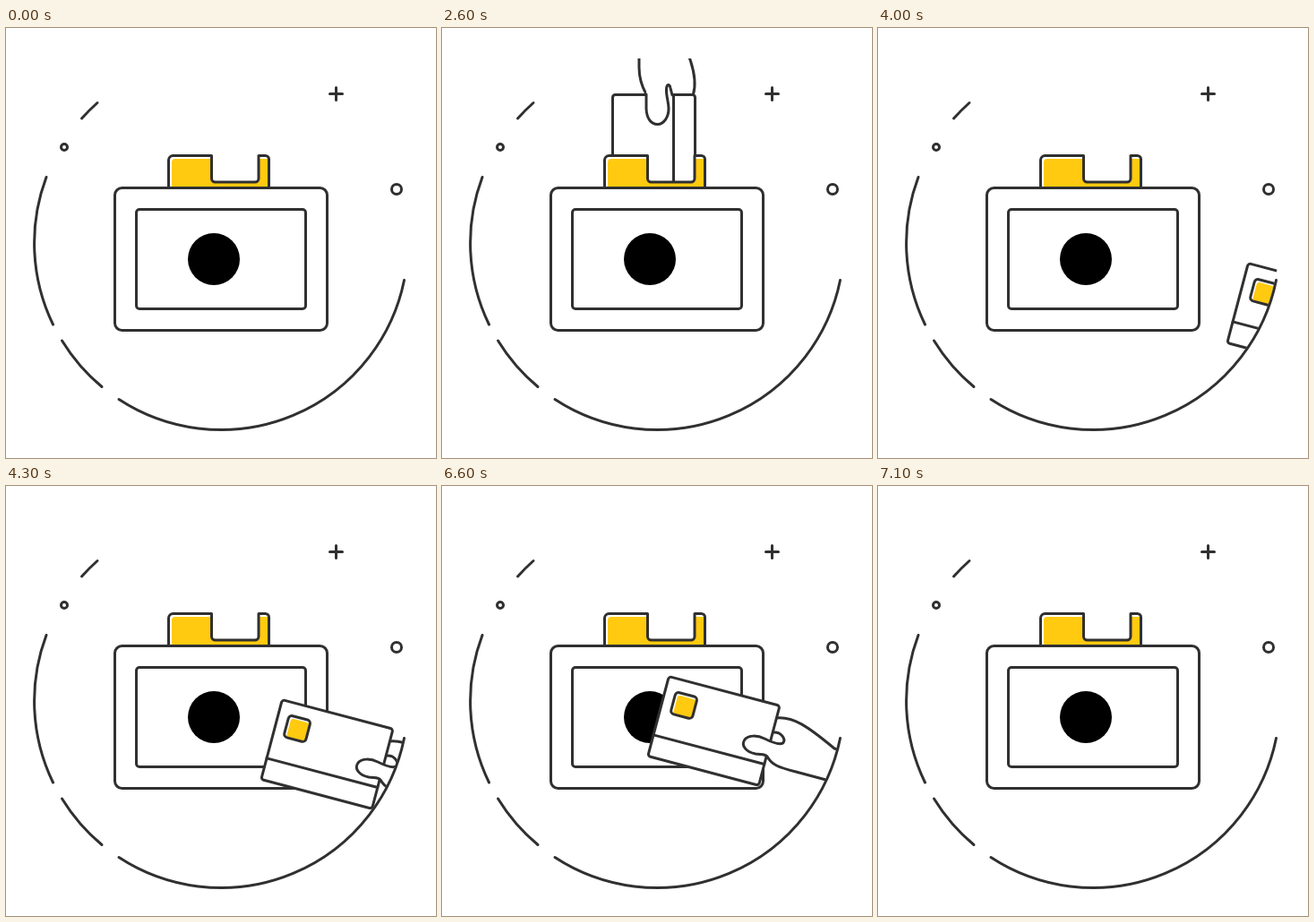
Recreate the animation shown at these times as an HTML page. Size 480 by 480 pixels, loop 7.2 s.

```html
<!DOCTYPE html>
<html lang="en">
<head>
<meta charset="utf-8">
<title>Card terminal</title>
<style>
  html, body { margin: 0; width: 100%; height: 100%; overflow: hidden; background: #fff; }
  svg { display: block; width: 100%; height: 100%; }
  .line { fill: none; stroke: #303031; stroke-width: 3; stroke-linecap: round; stroke-linejoin: round; }
  .solid { fill: #fff; }
  .butt { stroke-linecap: butt; }
  .gold { fill: #ffca0f; stroke: none; }
  .blank { fill: #fff; stroke: none; }

  .drop { animation: drop 7.2s infinite; }
  .tap { animation: tap 7.2s step-end infinite; }

  /* Card pushed into the slot, then pulled out, in 100 ms steps */
  @keyframes drop {
    0%      { transform: translateY(-240px); animation-timing-function: step-end; }
    1.388%  { transform: translateY(-200px); animation-timing-function: steps(5, end); }
    8.333%  { transform: translateY(0); animation-timing-function: step-end; }
    36.111% { transform: translateY(-40px); animation-timing-function: steps(4, end); }
    41.666% { transform: translateY(-210px); animation-timing-function: step-end; }
    100%    { transform: translateY(-240px); }
  }

  /* Card held to the screen along a shallow S-shaped path */
  @keyframes tap {
    0%      { transform: translate(300px, 60px); }
    55.555% { transform: translate(210px, 59px); }
    56.944% { transform: translate(175px, 58px); }
    58.333% { transform: translate(140px, 50px); }
    59.722% { transform: translate(105px, 35px); }
    61.111% { transform: translate(70px, 18px); }
    62.5%   { transform: translate(35px, 5px); }
    63.888% { transform: translate(0, 0); }
    91.666% { transform: translate(50px, 9px); }
    93.055% { transform: translate(96.5px, 31px); }
    94.444% { transform: translate(143px, 51px); }
    95.833% { transform: translate(189.5px, 59px); }
    97.222% { transform: translate(236px, 60px); }
    98.611% { transform: translate(300px, 60px); }
    100%    { transform: translate(300px, 60px); }
  }
</style>
</head>
<body>
<svg viewBox="0 0 480 480">
  <defs>
    <clipPath id="top"><rect y="34" width="480" height="446"/></clipPath>
    <clipPath id="disc"><circle cx="240" cy="240" r="207.5"/></clipPath>
  </defs>

  <!-- Palm and card behind the slot -->
  <g clip-path="url(#top)">
    <g class="drop line">
      <path class="solid" d="M220 28V84C220 97 223 105 228 114V122H279L280.5 114C287 92 272 61 263 43V28"/>
      <rect class="solid" x="190.5" y="114.5" width="92" height="127" rx="3"/>
      <path d="M258.5 115V241"/>
    </g>
  </g>

  <!-- Card slot -->
  <path class="blank" d="M181.5 180V142.5H229.5V172H282V142.5H293.5V180Z"/>
  <path class="gold" d="M185 180V150Q185 146 189 146H229.5V168Q229.5 172 233.5 172H278Q282 172 282 168V146H293V180Z"/>
  <path class="line butt" d="M181.5 180V147.5a5 5 0 0 1 5-5H229.5V168a4 4 0 0 0 4 4H278a4 4 0 0 0 4-4V142.5H289.5a4 4 0 0 1 4 4V180"/>

  <!-- Thumb in front of the slot -->
  <g clip-path="url(#top)">
    <g class="drop">
      <path class="blank" d="M228 112L228.500 130C228.500 142 234 147.500 240.500 147.500C248 147.500 253 139 253 130L257.500 115V106L246 98L229 106Z"/>
      <path class="line" d="M228 114V130C228.500 142 234 147.500 240.500 147.500C248 147.500 253 139 253 130C253 122 250 116 250.500 108C251 102 254 102.500 255 107L257 115"/>
    </g>
  </g>

  <!-- Terminal -->
  <rect class="line solid" x="121.500" y="178.500" width="237" height="159" rx="8"/>
  <rect class="line solid" x="145.500" y="202.500" width="189" height="111" rx="3.500"/>
  <circle cx="232" cy="258" r="29"/>

  <!-- Hand holding the card to the screen -->
  <g clip-path="url(#disc)">
    <g class="tap line">
      <path class="blank" d="M318 250H324C342 248 356 258 388 284L399 287L389 322L345 310L312 298Z"/>
      <path d="M323 250C342 248 358 259 388 284L398 287"/>
      <path class="solid" d="M401 282L412 285L399 330L389 327Z"/>
      <path class="solid" d="M413 278L465 286.500L450 355L397 337Z"/>
      <g transform="translate(203.300 203.600) rotate(14.800)">
        <rect class="solid" width="128" height="92" rx="3"/>
        <path d="M0 67.500H128"/>
        <rect class="blank" x="12" y="14.500" width="25" height="25" rx="4"/>
        <rect class="gold" x="15" y="17.500" width="22" height="22" rx="3"/>
        <rect x="12" y="14.500" width="25" height="25" rx="4"/>
      </g>
      <path class="blank" d="M331 278C327 281 318 277 310 273C302 269 292 269 288 274C283 281 290 288 300 290C306 291 311 291 313 293C318 302 325 305 345 310Z"/>
      <path d="M320 266C328 265 334 273 331 277.500C327 281 318 277 310 273C302 269 292 269 288 274C283 281 290 288 300 290C306 291 311 290 313 293C318 302 325 305 345 310L388 321.500"/>
    </g>
  </g>

  <!-- Broken ring and ornaments -->
  <g class="line">
    <path d="M444.500 281.500A208.500 208.500 0 0 1 126 414.500"/>
    <path d="M107 400.500A208.500 208.500 0 0 1 62.500 349"/>
    <path d="M52.500 331A208.500 208.500 0 0 1 45 166.500"/>
    <path d="M84.500 101A208.500 208.500 0 0 1 102 83.500"/>
    <circle cx="65" cy="133" r="3.500"/>
    <circle cx="436" cy="180" r="5.500"/>
    <path d="M361.500 73.500H375.500M368.500 66.500V80.500"/>
  </g>
</svg>
</body>
</html>
```
